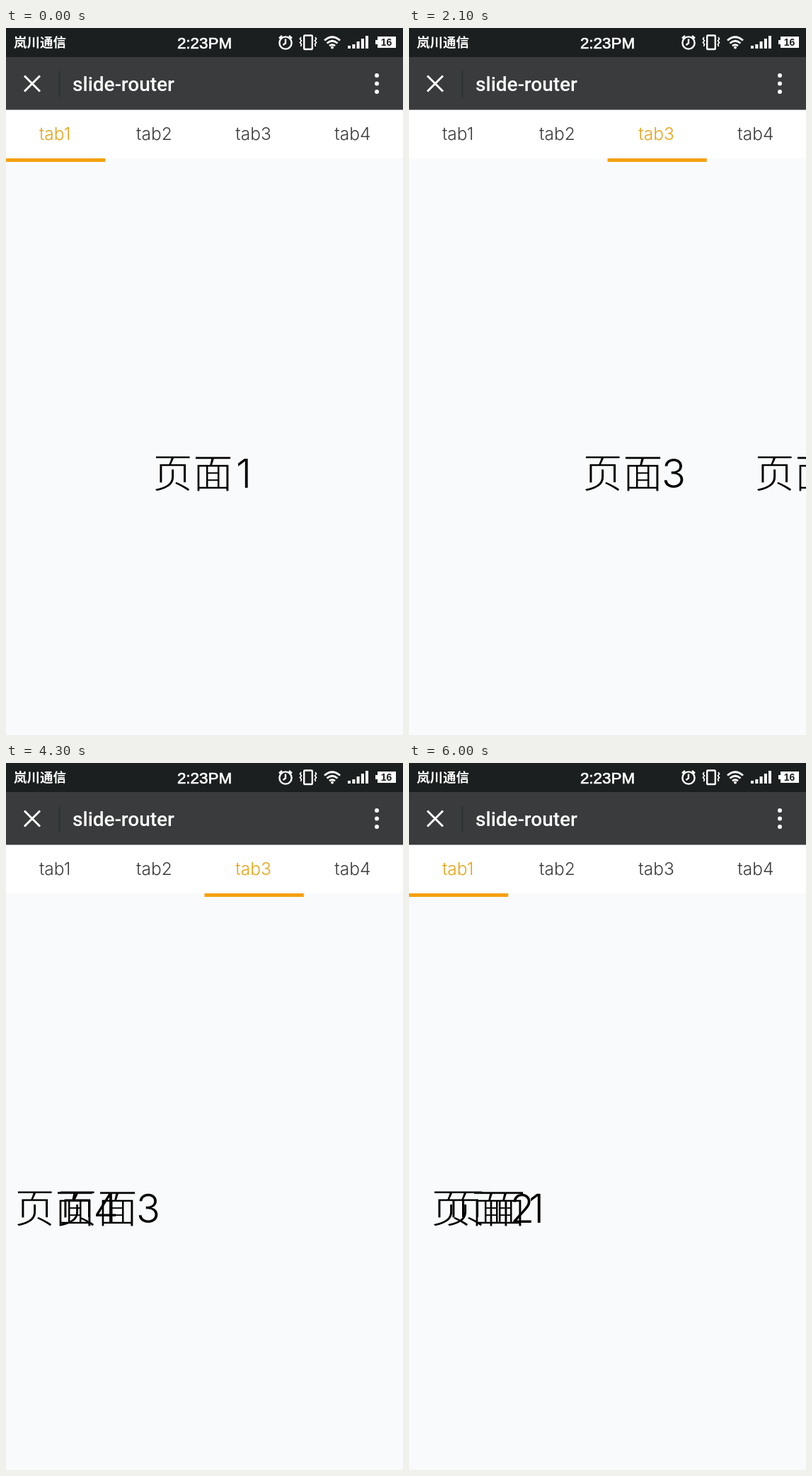
An HTML page for the animation above (6100 ms loop, 561 px wide and 998 px high).

```html
<!DOCTYPE html>
<html lang="zh">
<head>
<meta charset="utf-8">
<title>slide-router</title>
<style>
  html, body { margin: 0; width: 100%; height: 100%; overflow: hidden; background: #f9f9fb; }
  svg { display: block; width: 561px; height: 998px; }
  /* a white outline thins the characters; darken keeps it from erasing the other page */
  .page { mix-blend-mode: darken; }
  .label { font: 57px "Noto Sans CJK SC", "Noto Sans CJK", sans-serif; stroke: #fff; stroke-width: 1.4; }
  .digit, .tab { font-family: Inter, sans-serif; font-weight: 300; text-anchor: middle; }
  .digit { font-size: 56px; }
  .tab { font-size: 24.5px; fill: #3c3c3c; }
  .tab.active { fill: #e8a317; }
  .line { fill: none; stroke: #fff; }
  .solid { fill: #fff; }
  .carrier { font: 700 18.5px "Noto Sans CJK SC", "Noto Sans CJK", sans-serif; }
  .clock { font: 22.4px "Liberation Sans", sans-serif; stroke: #fff; stroke-width: .7; text-anchor: middle; }
  .title { font: 500 28px Roboto, sans-serif; }
  .charge { font: 700 14px "Liberation Sans", sans-serif; fill: #1c1f20; text-anchor: middle; }
</style>
</head>
<body>
<svg viewBox="0 0 561 998">
  <rect id="backdrop" width="561" height="998"/>
  <g id="pages"></g>

  <rect y="115" width="561" height="69" fill="#fff"/>
  <g id="tabs"></g>
  <rect id="bar" y="184" width="140.25" height="5" fill="#f5a00f"/>

  <!-- status bar -->
  <rect width="561" height="41" fill="#1c1f20"/>
  <text class="solid carrier" x="11" y="27">岚川通信</text>
  <text class="solid clock" x="280.5" y="28.5">2:23PM</text>
  <g class="line" stroke-width="2.4">
    <circle cx="395" cy="21" r="8.6"/>
    <path d="M395 15.5V21.5L391.5 24M386 14.5L390 11M404 14.5L400 11"/>
    <rect x="421.2" y="10.5" width="11.6" height="19.5" rx="1"/>
    <path stroke-width="1.7" d="M417 13l-1.5 2.5 2 2.5-2 2.5 2 2.5-1 3M437 13l1.5 2.5-2 2.5 2 2.5-2 2.5 1 3"/>
    <path stroke-width="2.8" d="M450 17.5Q461 8 472 17.5M453.5 21.5Q461 15 468.5 21.5M457 25.2Q461 22 465 25.2"/>
  </g>
  <circle class="solid" cx="461" cy="27.5" r="2"/>
  <path class="solid" d="M483 29v-4h4v4zM489.3 29v-6h4v6zM495.6 29v-10h4v10zM501.9 29v-14h4v14zM508 29v-18h4v18z"/>
  <path class="solid" d="M525 12h26v16h-26v-5h-3v-6h3z"/>
  <text class="charge" x="537.5" y="25">16</text>

  <!-- title bar -->
  <rect y="41" width="561" height="74.5" fill="#393b3c"/>
  <path class="line" stroke-width="3" d="M26 67.5L48 89.5M48 67.5L26 89.5"/>
  <path d="M75.5 60V98" stroke="#2e3031" stroke-width="1.5"/>
  <text class="solid title" x="94" y="89">slide-router</text>
  <g class="solid">
    <circle cx="524" cy="67" r="3"/>
    <circle cx="524" cy="78.5" r="3"/>
    <circle cx="524" cy="90" r="3"/>
  </g>
</svg>
<script>
  const LOOP = 6100, STEP = 100, DURATION = 750;
  const TAB_WIDTH = 140.25, PAGE_X = 208;
  const ENTER_FROM = 354, LEAVE_TO = 315;
  const BACKDROPS = ['#f9fafb', '#faf9fb'];
  const HELD = [700, 900]; // these steps repeat the one before
  const slides = [
    { start: 588, from: 0, to: 1 },
    { start: 1596, from: 1, to: 2 },
    { start: 2877, from: 2, to: 3 },
    { start: 4013, from: 3, to: 2 },
    { start: 4820, from: 2, to: 1 },
    { start: 5748, from: 1, to: 0 }
  ];

  const byId = id => document.getElementById(id);
  const numbers = [1, 2, 3, 4];
  byId('tabs').innerHTML = numbers.map((n, i) =>
    `<text class="tab" x="${(i + .5) * TAB_WIDTH - 1}" y="158">tab${n}</text>`).join('');
  byId('pages').innerHTML = numbers.map(n =>
    `<g class="page"><text class="label" x="-1" y="649">页面</text><text class="digit" x="128" y="649">${n}</text></g>`).join('');
  const tabs = [...byId('tabs').children];
  const pages = [...byId('pages').children];

  const easeOut = x => 1 - (1 - x) ** 2;

  function showPage(index, offset) {
    pages[index].style.display = '';
    pages[index].setAttribute('transform', `translate(${PAGE_X + offset} 0)`);
  }

  function render(time) {
    const slide = slides.filter(s => s.start <= time).pop();
    const active = slide ? slide.to : 0;
    tabs.forEach((tab, i) => tab.classList.toggle('active', i === active));
    byId('bar').setAttribute('x', active * TAB_WIDTH);
    byId('backdrop').setAttribute('fill', BACKDROPS[active % 2]);

    pages.forEach(page => page.style.display = 'none');
    const x = slide ? (time - slide.start) / DURATION : 1;
    if (x >= 1) return showPage(active, 0);
    const side = Math.sign(slide.to - slide.from);
    const p = easeOut(x);
    showPage(slide.from, side * LEAVE_TO * p);
    showPage(slide.to, side * ENTER_FROM * (1 - p));
  }

  const begin = performance.now();
  function tick() {
    let time = Math.floor((performance.now() - begin) % LOOP / STEP) * STEP;
    if (HELD.includes(time)) time -= STEP;
    render(time);
    requestAnimationFrame(tick);
  }
  tick();
</script>
</body>
</html>
```
